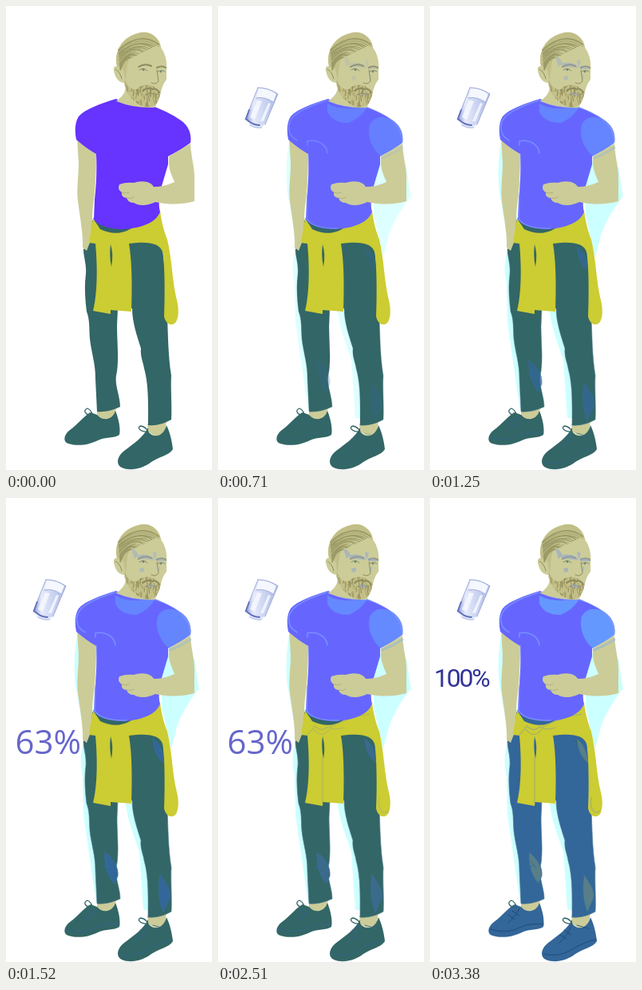
Recreate the animation shown at these times as an HTML page. Size 258 px wide and 580 px high, loop 4.85 s.

```html
<!DOCTYPE html>
<html lang="en">
<head>
<meta charset="utf-8">
<title>Refreshing figure</title>
<style>
html, body { margin: 0; width: 100%; height: 100%; overflow: hidden; background: #fff; }
svg { display: block; width: 258px; height: 580px; }
.skin { fill: #cccc99; }
.shirt { fill: var(--shirt); }
.pants { fill: var(--pants); }
.wool { fill: #cccc33; }
.line { fill: none; stroke-linecap: round; stroke-linejoin: round; }
</style>
</head>
<body>
<svg viewBox="0 0 258 580">
  <defs>
    <linearGradient id="glassTint" x1="0" x2="1">
      <stop offset="0" stop-color="#8c9ad6"/>
      <stop offset=".25" stop-color="#e6eafa"/>
      <stop offset=".6" stop-color="#cad4f1"/>
      <stop offset="1" stop-color="#aab7e2"/>
    </linearGradient>
    <clipPath id="beardClip"><path d="M149 91C152 101 157 105 164 104C170 97 184 97 189 104L194 107C192 119 187 127 177 127C163 124 150 112 148 95Z"/></clipPath>
    <clipPath id="shirtClip"><path id="shirtShape" d="M138 116C118 122 99 129 91 138C86 146 86 157 88 167C96 174 104 180 113 185C114 205 113 225 111 242L110 267C116 275 130 279 148 279C174 277 189 269 193 257C190 248 193 233 195 225L203 198V188C213 183 223 177 231 171C233 160 228 149 219 143C208 135 196 130 186 126C170 127 150 124 138 116Z"/></clipPath>
    <path id="legs" d="M107 268V294L97 304C97 314 101 322 100 335C98 350 99 366 101 382C105 392 104 402 105 416C107 434 112 446 112 466L114 507C124 508 134 505 143 501C143 488 136 474 138 462C142 445 139 420 139 400L140 378H158C158 395 164 412 169 428C168 439 172 445 173 453C179 474 178 500 178 524C188 525 198 522 207 517C208 500 206 478 207 462C203 438 203 410 202 390L200 340L192 268Z"/>
  </defs>

  <g id="shadow" fill="#ccffff">
    <path d="M89 170C85 195 84 225 89 245L97 292L98 304C92 320 93 332 96 348L97 395L107 465L113 506L126 450L112 300L100 180Z"/>
    <path d="M203 192L212 221H230L236 200L240 228L242 238C232 250 220 268 214 286L207 314L195 262V226Z"/>
    <path d="M150 382C152 402 160 422 167 442L171 500L172 515H180L176 460L160 382Z"/>
  </g>

  <path class="skin" d="M114 503L138 501L136 514L126 519L114 513ZM177 522L201 517L199 534L190 540L178 532Z"/>
  <g class="pants">
    <use href="#legs"/>
    <path d="M106 508C99 511 90 523 80 530C72 536 71 545 78 547C91 551 105 548 115 543C125 538 135 541 142 536C144 527 140 513 137 506C134 517 121 520 114 511Z"/>
    <path d="M178 527C172 539 160 547 148 556C138 564 138 574 145 577C156 582 172 578 182 570C192 563 204 562 209 554C208 544 205 532 201 524C198 537 186 542 178 532Z"/>
  </g>
  <path class="line" stroke="#336666" stroke-width="1.3" d="M108 511C99 512 96 505 102 503Q107 505 108 511M178 532C168 533 163 526 169 525Q175 526 178 532M183 303Q185 315 192 320"/>

  <g class="line" stroke-width=".9">
    <use href="#legs" id="seams" stroke="#4a7d92"/>
    <path id="laces" d="M75 539Q98 546 114 536Q127 531 142 533M142 570Q162 575 180 563Q195 554 208 552M103 516L112 522M98 521L106 527M112 513Q108 522 98 531M168 540L177 546M163 546L171 551M177 535Q173 546 162 556M184 534L198 538"/>
  </g>
  <g id="patches" stroke="#356f9d" stroke-width=".9">
    <path d="M124 443C132 448 141 460 140 472L136 482C128 474 123 460 124 443Z"/>
    <path d="M193 471C199 480 207 490 205 500L197 518C192 505 190 490 193 471Z"/>
    <path d="M184 301C192 306 197 318 199 332C190 326 185 316 184 301Z"/>
    <path class="line" d="M122 462L130 459M126 454L133 463"/>
  </g>

  <path class="skin" d="M89 164L113 182C113 205 112 225 110 243C107 260 109 278 106 293L101 306L96 302C97 286 92 260 90 244C88 230 91 212 91 197Z"/>

  <path class="wool" d="M109 265C117 282 139 288 158 274L193 256C195 271 198 282 202 292C208 316 208 344 214 368C217 380 216 389 213 395C208 401 200 398 198 388C199 365 199 335 197 310C194 295 176 294 154 297C158 320 158 352 157 382L131 380V385L109 381C114 361 115 330 112 297L104 296Z"/>
  <path class="pants" d="M109 265L118 279Q139 289 157 278L150 270ZM131 298Q135 310 132 326Q129 312 131 298Z"/>
  <path id="woolLines" class="line" stroke="#9fae70" stroke-width="1.2" d="M122 286Q131 293 137 286Q146 291 157 287M120 289Q130 302 140 289M131 324V383M112 296Q118 290 122 284M140 287Q158 276 190 270M202 374C199 390 207 397 213 391"/>

  <use href="#shirtShape" class="shirt"/>
  <g clip-path="url(#shirtClip)">
    <g id="highlights" fill="#66a2ff">
      <path d="M137 122Q155 132 187 126Q180 139 164 146C151 147 141 141 137 132Z"/>
      <path d="M190 148C197 136 208 137 220 143L234 158V172L204 188C194 180 186 164 190 148Z"/>
    </g>
    <path id="shirtLines" class="line" stroke="#7f99ff" stroke-width="1.5" d="M136 118C112 126 94 134 90 145Q85 160 99 168M112 174V169C124 166 136 173 137 184M138 118Q162 129 187 127Q230 140 231 170M113 185L111 266Q119 279 151 278"/>
  </g>

  <path class="skin" d="M204 188L231 172C232 190 236 201 236 213V244C222 248 207 249 187 245C180 249 167 251 160 246Q153 246 151 240Q144 239 145 233Q139 229 142 223Q150 220 160 221Q168 218 177 220Q183 222 185 226Q198 226 211 220C207 210 203 204 204 188Z"/>
  <path class="line" stroke="#aaa979" stroke-width=".8" d="M145 233Q150 235 154 233M151 240Q156 242 160 239"/>
  <path id="cuff" class="line" stroke="#99bbcc" stroke-width="3" d="M205 190Q219 185 231 177"/>

  <path class="skin" d="M165 34C179 29 193 39 194 52C200 60 202 70 201 80V92C195 99 195 106 192 113C189 125 185 127 186 127Q160 128 138 119C149 111 151 105 149 96C141 96 137 90 135 81Q134 75 139 75C135 57 145 39 165 34Z"/>
  <path fill="#c1be87" d="M194 52C191 37 177 29 164 35C145 40 135 57 139 75L147 79L150 94C152 79 150 67 160 59C168 51 182 47 194 52Z"/>
  <g id="hair" class="line" stroke="#999966"></g>
  <g clip-path="url(#beardClip)">
    <path fill="#c3bf87" d="M145 88H197V130H145Z"/>
    <g id="beard" class="line" stroke="#95905d"></g>
  </g>
  <g class="line" stroke="#8e8b5e">
    <path stroke-width="2" d="M166 76Q174 71 182 75M189 77Q195 74 200 77M171 106Q178 101 183 104Q188 102 192 108"/>
    <path stroke-width="1" d="M167 80Q172 76 177 81M190 82Q195 79 199 82M189 80L191 94Q187 99 182 96M137 79Q143 82 145 91M174 111Q182 107 189 111"/>
  </g>
  <g fill="#668888"><circle cx="172" cy="79.5" r="1.5"/><circle cx="194" cy="82" r="1.3"/></g>
  <path id="faceTint" fill="#96a8cc" d="M157 64Q163 63 166 72L161 76ZM164 72Q174 68 184 74L185 78Q175 75 166 77ZM187 76Q195 72 202 79L189 79ZM167 88L173 87V92L168 93ZM189 87L193 86L192 92ZM175 109Q182 107 187 110L183 113ZM184 67L189 69L186 77Z"/>

  <g id="glass">
    <path fill="#e6ebf8" d="M38 147Q46 155 56 152L58 147L42 143Z"/>
    <path fill="url(#glassTint)" d="M50 102Q63 102 75 110L59 148Q49 152 34 142Z"/>
    <path fill="#f5f7fe" d="M51 103Q64 103 73 110L69 120Q57 113 48 114Z"/>
    <path fill="#f6f8ff" opacity=".85" d="M49 118L55 119L46 142L40 139ZM63 121L66 122L57 144L53 144Z"/>
    <path class="line" stroke="#98a4d6" stroke-width=".9" d="M50 102Q63 102 75 110L59 148M50 102L34 142M48 115Q59 113 69 120"/>
    <path class="line" stroke="#5f6fbb" stroke-width="1.8" d="M35 141Q43 149 52 149M39 130L35 141"/>
    <path class="line" stroke="#b3bee4" stroke-width="1.3" d="M40 149Q47 153 54 152"/>
  </g>

  <text id="part" x="11.5" y="320" font-family="'Open Sans', 'Noto Sans', sans-serif" font-size="42" fill="#6666cc">63%</text>
  <text id="full" x="5" y="236" font-family="Roboto, 'Open Sans', sans-serif" font-size="32" letter-spacing="-2.2" fill="#333399">100%</text>
</svg>
<script>
const LOOP = 4850, START = 170, STEP = 30, END = 3080;
const $ = id => document.getElementById(id);
const svg = document.querySelector('svg');

let seed = 7;
const rnd = () => (seed = seed * 16807 % 2147483647) / 2147483647;

function strand(parent, d, width) {
  const path = document.createElementNS(svg.namespaceURI, 'path');
  path.setAttribute('d', d);
  path.setAttribute('stroke-width', width);
  parent.append(path);
}

for (let i = 0; i < 15; i++) {
  const u = i / 14, bend = 6 * rnd();
  strand($('hair'), `M${191 - 39 * u} ${48 + 19 * u}Q${168 - 20 * u} ${31 + 30 * u + bend} ${141 + 2 * u} ${55 + 25 * u}`, .5 + 1.3 * rnd());
}
for (let i = 0; i < 75; i++) {
  const x = 148 + 45 * rnd(), y = 91 + 32 * rnd();
  strand($('beard'), `M${x} ${y}q${2 * rnd()} 3 ${3 * rnd() - 1} ${4 + 4 * rnd()}`, .5 + .8 * rnd());
}

// Interpolates between alternating times and values (numbers or RGB lists).
function key(t, ...stops) {
  if (t <= stops[0]) return stops[1];
  for (let i = 2; i < stops.length; i += 2) {
    if (t > stops[i]) continue;
    const u = (t - stops[i - 2]) / (stops[i] - stops[i - 2]);
    const a = stops[i - 1], b = stops[i + 1];
    return Array.isArray(a) ? a.map((v, k) => v + (b[k] - v) * u) : a + (b - a) * u;
  }
  return stops[stops.length - 1];
}
const rgb = c => `rgb(${c.map(Math.round)})`;
const fade = (id, v) => $(id).style.opacity = v;

function draw(now) {
  const time = now % LOOP;
  const t = time < START ? 0 : Math.min(END, START + Math.floor((time - START) / STEP) * STEP);
  const blue = t >= 2990;
  const paint = (name, c) => svg.style.setProperty(name, rgb(c));

  paint('--shirt', key(t, 170, [102, 51, 255], 530, [102, 102, 255]));
  paint('--pants', blue ? [51, 102, 153] : [51, 102, 102]);
  $('laces').setAttribute('stroke', blue ? '#1f4a75' : '#33668f');
  $('patches').setAttribute('fill', rgb(key(t, 1520, [51, 102, 153], 2180, [51, 102, 145], 2900, [68, 110, 132], 3080, [88, 126, 136])));
  fade('shadow', key(t, 350, 0, 900, 1));
  fade('highlights', key(t, 170, 0, 350, .32, 1010, .5, 2900, .62, 3080, .85));
  fade('shirtLines', key(t, 170, 0, 350, .45, 1500, .8));
  fade('cuff', key(t, 350, 0, 1010, .5, 3080, .7));
  fade('faceTint', key(t, 400, 0, 1010, .45, 3080, .65));
  fade('seams', key(t, 170, 0, 1010, .5, 1800, .8));
  fade('laces', key(t, 350, 0, 1010, .65, 1520, 1));
  fade('patches', key(t, 400, 0, 1010, .55, 1520, 1));
  fade('woolLines', key(t, 1520, 0, 2180, .45, 3080, .9));
  fade('glass', +(t >= START));
  fade('part', +(time >= 1400 && time < 3380));
  fade('full', +(time >= 3380));
}

const begin = performance.now();
function frame() {
  draw(performance.now() - begin);
  requestAnimationFrame(frame);
}
frame();
</script>
</body>
</html>
```
